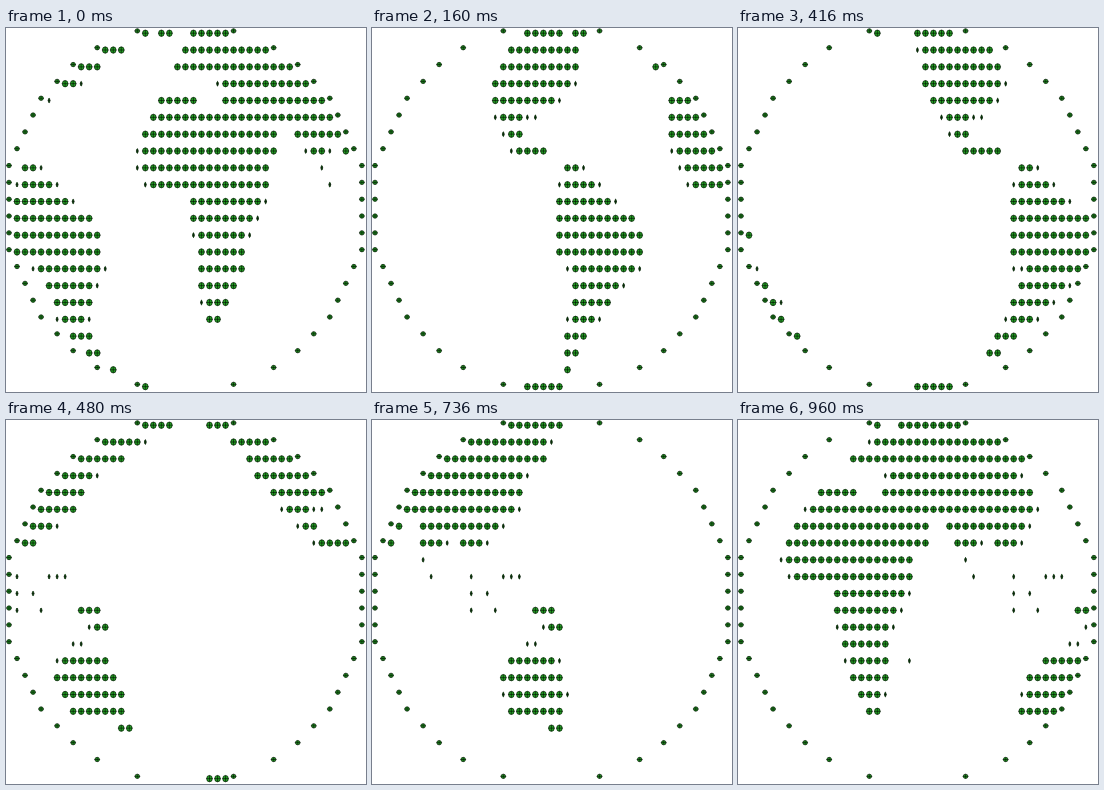
Animation of 360x364 px, one loop 1120 ms. Source, as an HTML page with a canvas:

```html
<!DOCTYPE html>
<html>
<head>
<meta charset="utf-8">
<style>
html, body { margin: 0; width: 100%; height: 100%; overflow: hidden; background: #fff; }
canvas { display: block; }
</style>
</head>
<body>
<canvas id="stage" width="360" height="364"></canvas>
<script>
const ctx = document.getElementById('stage').getContext('2d');
const GREEN = '#24a024', DARK = '#041404';
const ROWS = 22, COLS = 44, WORLD = 2 * COLS, FRAME_MS = 160, FRAMES = 7;

// Flat world map: x is longitude (0..88, may run on past the seam), y is the row.
const continents = new Path2D([
  // Eurasia and Africa
  `M25.5 -.5 H62 L54.5 1 V2.4 L50.3 2.8 V5 L47.8 6 L46 7.4 L43 7.2 L42.5 6.4
   L39.7 7.4 H38 L37 5.5 H34.5 L34 7.4 L32.6 7.6 V9.4 L29.5 12 V14 L27 17.4
   H25.4 L23.7 14 L22.6 9.6 L17.5 9.4 L16 7.5 V6 L18 3.6 H23.7 V4.5 H27.8
   V2.6 L20 2.4 V1.6 Z`,
  // North America and Greenland
  `M74 -.5 H94 L95 1 L93.5 2 L88.2 4.4 L84 5 L83.5 6.4 L87.5 6.6 V7.4 H83.4
   L80.5 5 L77.5 3 V1 Z M98.5 -.5 H104 V.4 H98.5 Z`,
  // South America
  `M1.6 7.6 L3.4 8 L7.6 10 L11.5 11.6 L11.3 14 L5.5 18 L4 20 L2.6 18.5
   L3 14 L.6 13.4 V10.5 Z`,
  // Australia, New Guinea, Antarctica
  'M50 13.6 H55.6 L57 16 L56.6 18.4 H54.6 V17.4 H48.5 L48 15 Z',
  'M52.6 10.7 H55.3 L56.4 12.3 H54.7 Z',
  'M76.8 20.6 H92 V21.4 H76.8 Z'
].join(' '));

const islands = new Path2D(
  'M39 7.7 L40 9.3 M45.5 7.7 L45 11.3 M47 10 L48 11 M49 9 H51 M52 13 H53.4 M32 14 L31 15');

// First column of the disc on a row.
function rimColumn(row) {
  const half = 180 * Math.sqrt(1 - ((row - 10.5) / 10.9) ** 2);
  return Math.max(0, Math.round((176.5 - half) / 8));
}

function dot(x, y, rx, ry) {
  ctx.beginPath();
  ctx.ellipse(x, y, rx, ry, 0, 0, Math.PI * 2);
  ctx.fillStyle = GREEN;
  ctx.fill();
  ctx.moveTo(x, y - ry);
  ctx.lineTo(x, y + ry);
  ctx.moveTo(x - rx - 0.6, y);
  ctx.lineTo(x + rx + 0.6, y);
  ctx.strokeStyle = DARK;
  ctx.lineWidth = 0.65;
  ctx.stroke();
}

function onMap(test, lon, row) {
  return test(lon, row) || test(lon + WORLD, row);
}
const isLand = (lon, row) => ctx.isPointInPath(continents, lon, row);
const isShore = (lon, row) => {
  ctx.lineWidth = 0.7;
  return ctx.isPointInStroke(continents, lon, row) || ctx.isPointInStroke(islands, lon, row);
};

function draw(step) {
  ctx.fillStyle = '#fff';
  ctx.fillRect(0, 0, 360, 364);
  for (let row = 0; row < ROWS; row++) {
    const left = rimColumn(row), right = COLS - left;
    const y = 5.2 + 16.83 * row;
    for (let col = left; col <= right; col++) {
      const x = 3 + 8.02 * col;
      // Each row shows half of the map, squeezed to the width of the disc.
      const across = (col - left) / (right - left);
      const lon = (across * COLS - step * WORLD / 8 + WORLD) % WORLD;
      if (col === left || col === right) dot(x, y - 2.3, 2.3, 2.2);
      else if (onMap(isLand, lon, row)) dot(x, y, 2.8, 3.2);
      else if (onMap(isShore, lon, row)) dot(x, y, 0.8, 2.3);
    }
  }
}

// Eighth-turn steps; the turn skips its second position.
function tick() {
  const index = Math.floor(performance.now() / FRAME_MS) % FRAMES;
  draw(index ? index + 1 : 0);
  requestAnimationFrame(tick);
}
tick();
</script>
</body>
</html>
```
